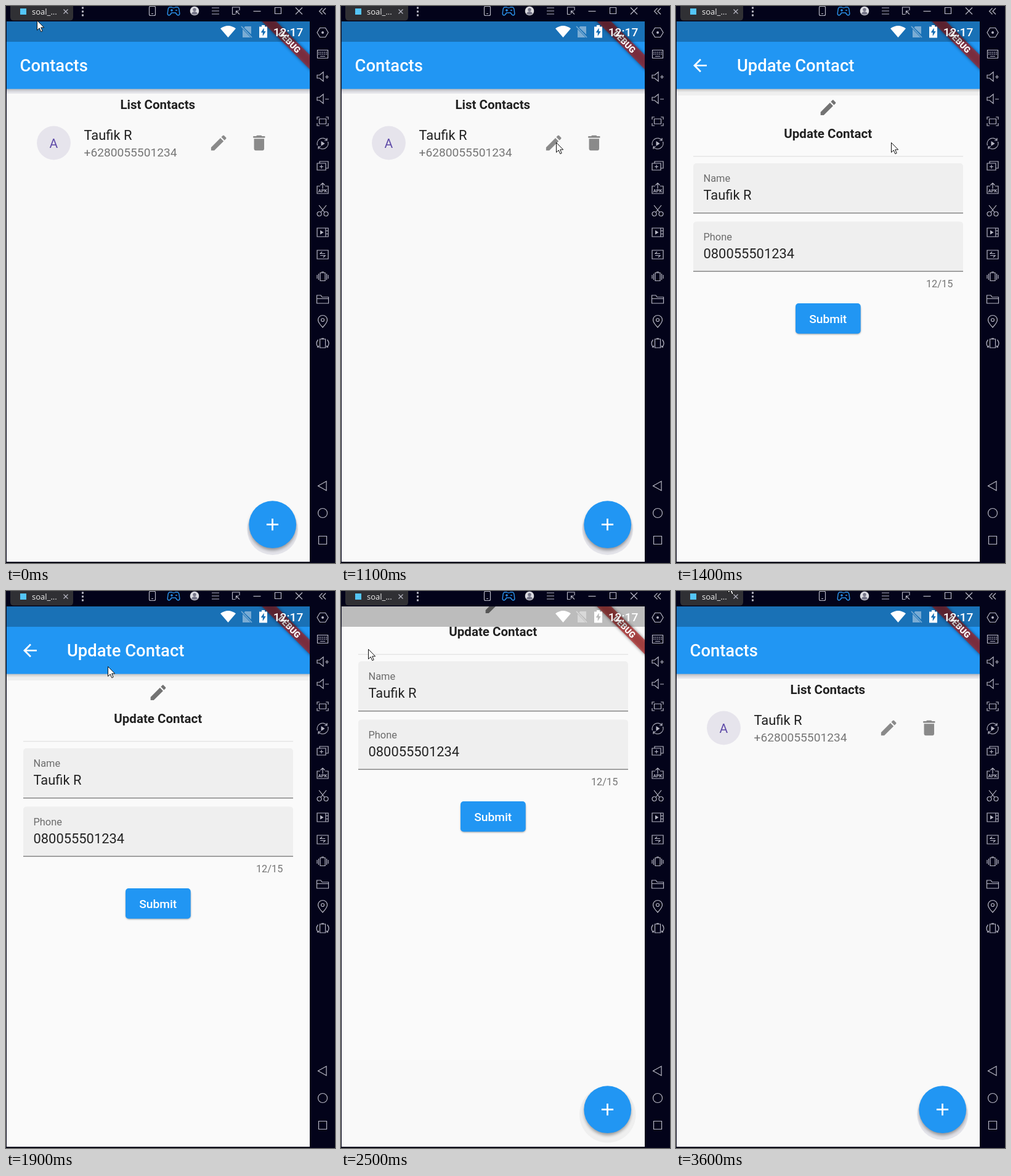
Write an HTML page that moves like this. It is 534 px wide and 903 px high and loops after 4.3 s.

```html
<!DOCTYPE html>
<html lang="en">
<head>
<meta charset="utf-8">
<title>Contacts</title>
<style>
html, body { margin: 0; width: 100%; height: 100%; overflow: hidden; background: #03031a; }
svg { display: block; width: 100%; height: 100%; }
text { font-family: Roboto, sans-serif; white-space: pre; }
.line { fill: none; stroke: #b8b8c4; stroke-width: 1.2; }
.solid { fill: #b8b8c4; stroke: none; }
</style>
</head>
<body>
<svg id="stage" viewBox="0 0 534 903" xmlns="http://www.w3.org/2000/svg"></svg>
<script>
const LOOP = 4300, STEP = 100, PAGE_H = 876;
const NAME = 'Taufik R', PHONE = '80055501234';

const ICONS = {
  edit: 'M3 17.25V21h3.75L17.81 9.94l-3.75-3.75L3 17.25zM20.71 7.04c.39-.39.39-1.02 0-1.41l-2.34-2.34c-.39-.39-1.02-.39-1.41 0l-1.83 1.83 3.75 3.75 1.83-1.83z',
  bin: 'M6 19c0 1.1.9 2 2 2h8c1.1 0 2-.9 2-2V7H6v12zM19 4h-3.5l-1-1h-5l-1 1H5v2h14V4z',
  add: 'M19 13h-6v6h-2v-6H5v-2h6V5h2v6h6v2z',
  back: 'M20 11H7.83l5.59-5.59L12 4l-8 8 8 8 1.41-1.41L7.83 13H20v-2z'
};

const rect = (x, y, w, h, fill, extra = '') =>
  `<rect x="${x}" y="${y}" width="${w}" height="${h}" fill="${fill}" ${extra}/>`;
const circle = (x, y, r, fill, extra = '') =>
  `<circle cx="${x}" cy="${y}" r="${r}" fill="${fill}" ${extra}/>`;
const text = (x, y, size, fill, str, weight = 400, anchor = 'start') =>
  `<text x="${x}" y="${y}" font-size="${size}" fill="${fill}" font-weight="${weight}" text-anchor="${anchor}">${str}</text>`;
const icon = (name, x, y, fill) =>
  `<path d="${ICONS[name]}" fill="${fill}" transform="translate(${x} ${y}) scale(1.37) translate(-12 -12)"/>`;
const glyph = (x, y, d, more = '') =>
  `<g class="line" transform="translate(${x} ${y})"><path d="${d}"/>${more}</g>`;
const solid = d => `<path class="solid" d="${d}"/>`;

function appBar(title, x, depth, tint) {
  return rect(1, 134, 492, depth, tint) +
    rect(1, 134, 492, 6, 'url(#shade)') +
    rect(1, 25, 492, 109.5, '#2196f3') +
    text(x, 106, 27.4, '#fff', title, 500);
}

function homePage() {
  return rect(1, 25, 492, PAGE_H, '#f9f9f9') +
    appBar('Contacts', 22.5, 8, '#e4e4e9') +
    text(246.3, 167, 20.5, '#212121', 'List Contacts', 700, 'middle') +
    circle(77.5, 222, 27.4, '#e6e4ec') +
    text(77.3, 229.5, 21, '#5f4ba8', 'A', 400, 'middle') +
    text(126.5, 217, 21.9, '#212121', NAME) +
    text(126.5, 244, 19.2, '#767676', '+62' + PHONE) +
    icon('edit', 345.2, 222, '#8a8a8a') +
    icon('bin', 410.8, 222, '#8a8a8a') +
    circle(432.7, 848.8, 41.2, '#e3e3e9', 'id="halo"') +
    circle(432.7, 844.5, 38, '#000', 'opacity=".35" filter="url(#soft)"') +
    circle(432.7, 840.7, 38.4, '#2196f3') +
    icon('add', 432.5, 840.7, '#fff');
}

function field(y, label, value) {
  return `<path d="M28 ${y + 81}V${y + 5.5}q0-5.5 5.5-5.5h427q5.5 0 5.5 5.5V${y + 81}z" fill="#efefef"/>` +
    rect(28, y + 80, 438, 1.3, '#777') +
    text(44.5, y + 30, 16.4, '#6c6c6c', label) +
    text(44.5, y + 59, 21.9, '#242424', value);
}

function editPage() {
  return rect(1, 25, 492, PAGE_H, '#fafafa') +
    appBar('Update Contact', 99, 11, '#efefef') +
    icon('back', 39, 96.5, '#fff') +
    icon('edit', 247, 164.7, '#737373') +
    text(246.7, 213.5, 20.5, '#212121', 'Update Contact', 700, 'middle') +
    rect(28, 243, 438, 1.4, '#e4e4e4') +
    field(255, 'Name', NAME) +
    field(349.5, 'Phone', '0' + PHONE) +
    text(449.5, 456, 16.4, '#757575', '12/15', 400, 'end') +
    rect(194.5, 485, 105, 47, '#000', 'rx="5" opacity=".4" filter="url(#tight)"') +
    rect(194, 482, 105.7, 49.3, '#2196f3', 'rx="5"') +
    text(246.7, 514, 19.2, '#fff', 'Submit', 500, 'middle');
}

function banner() {
  return `<g transform="translate(493 25) rotate(45)">` +
    rect(-60, 38.4, 120, 16.4, '#000', 'opacity=".5" filter="url(#soft)"') +
    rect(-60, 38.4, 120, 16.4, '#b71c1c', 'fill-opacity=".63"') +
    text(0, 51.6, 14, '#fff', 'DEBUG', 900, 'middle') + '</g>';
}

function statusBar() {
  return rect(1, 25, 492, 33, '#000', 'opacity=".25"') +
    '<path d="M348 36.5Q360.5 27.5 373 36.5L360.5 51Z" fill="#fff"/>' +
    '<g opacity=".42"><path d="M388 33h10v13L386.500 35zM384 37.500L397 51h-13z" fill="#fff"/>' +
    '<path d="M382 33L399 51" stroke="#fff" stroke-width="1.600"/></g>' +
    '<path d="M411 33.500h4v-2.500h5v2.500h4v18h-13zM418.700 35.500l-5 7.500h3v6l5-8h-3z" fill="#fff" fill-rule="evenodd"/>' +
    text(433.7, 49, 19.2, '#fff', '12:17', 500);
}

function windowBar() {
  return '<path d="M7 0h102v18q0 5.500-5.500 5.500h-91q-5.500 0-5.500-5.500z" fill="#303034"/>' +
    rect(23, 4, 10, 10, '#54c5f8') +
    `<text x="42" y="14" font-size="13" fill="#f0f0f0" style="font-family:'Open Sans',sans-serif">soal_...</text>` +
    glyph(97, 9, 'M-3.500-3.500l7 7m0-7l-7 7') +
    [3, 9, 15].map(y => rect(123, y - 1.5, 3, 3, '#b8b8c4')).join('') +
    glyph(237.5, 8, 'M-5-5.500q0-2 2-2h6q2 0 2 2v11q0 2-2 2h-6q-2 0-2-2zM-1.500 4.500h3') +
    '<path d="M266 2h3q3 2 6 0h3q2.500 0 3 4l.800 6q0 3-2.500 3-1.500 0-4-4h-6.600q-2.500 4-4 4-2.500 0-2.500-3l.800-6q.500-4 3-4zM267 7h4m-2-2v4M275 7h3" fill="none" stroke="#2a8fe6" stroke-width="1.500"/>' +
    circle(306, 8, 7.3, '#dcdce2') + circle(306, 6, 2.7, '#77778a') +
    '<path d="M301 12.500q1-3.500 5-3.500t5 3.500q-5 3.500-10 0z" fill="#77778a"/>' +
    glyph(340, 8, 'M-6-5h12M-6 0h12M-6 5h12') +
    glyph(373.5, 8, 'M-1 5.500h-5v-11.500h11.500v5M0 0l5.500 5.500M0 4.500V0h4.500') +
    glyph(407.5, 8, 'M-6 .500h12') +
    glyph(441.500, 8, 'M-5-5.500h10v10h-10z') +
    glyph(475.5, 8, 'M-5.500-5.500l11 11m0-11l-11 11') +
    glyph(514, 8.5, 'M-.500-5l-5 5 5 5M5-5l-5 5 5 5');
}

function sideBar() {
  const speaker = 'M-9-3h4l6-5v15l-6-5h-4z';
  const phone = 'M-4-6.500h8v13h-8z';
  const tile = 'M-9-7h18v14h-18z';
  const keys = [-3, 0].map(y => [-6, -3, 0, 3, 6].map(x => solid(`M${x - .8} ${y - .8}h1.600v1.600h-1.600z`)).join('')).join('');
  return [
    [43, 'M-9 0l4.500-7.500h9l4.500 7.500-4.500 7.500h-9z', '<circle class="solid" r="2"/>'],
    [78, 'M-8.500-6.500h17v13h-17zM-4 3.500h8', keys],
    [115, speaker + 'M4 0h6M7-3v6'],
    [151, speaker + 'M4 0h6'],
    [187, 'M-9-3v-4h4M5-7h4v4M9 3v4h-4M-5 7h-4v-4M-5.500-4h11v8h-11z'],
    [223, 'M-8.500 3a9 9 0 0 1 15-9M8.500-3a9 9 0 0 1-15 9M7-9v4h-4M-7 9v-4h4', solid('M-2.500-4l6 4-6 4z')],
    [259, 'M-9-4h14v11h-14zM-5-4v-3h14v11h-4M-2-1.500v6M-5 1.500h6'],
    [296, 'M-4-4h-5v12h18v-12h-5M0 0v-9M-3.500-5.500l3.500-3.500 3.500 3.500',
      '<text class="solid" y="6" font-size="7.500" font-weight="700" text-anchor="middle">APK</text>'],
    [332, 'M-6-9l9.500 12M6-9l-9.500 12M-9 5a3.500 3.500 0 1 0 7 0 3.500 3.500 0 1 0-7 0M2 5a3.500 3.500 0 1 0 7 0 3.500 3.500 0 1 0-7 0'],
    [367, tile + 'M5-7v14M5-2.500h4M5 2.500h4', solid('M-4-3.500l5.500 3.500-5.500 3.500z')],
    [403, tile + 'M4-1.500h-8l3-3M-4 1.500h8l-3 3'],
    [439, phone + 'M-6.500-5v10M6.500-5v10M-9-3v6M9-3v6M-2-8h4'],
    [475.5, 'M-9.500 6.500v-13h6.500l2 3h10.500v10zM-9.500-1h19'],
    [511, 'M0 10q-7.500-8-7.500-12a7.500 7.500 0 0 1 15 0q0 4-7.500 12z', '<circle cy="-2" r="2.500"/>'],
    [547, 'M-4.500-7h9v14h-9zM-2-8h4M-7.500-6q-5 6 0 12M7.500-6q5 6 0 12', solid('M-9.500 6.500h3.500v-3.500zM9.500 6.500h-3.500v-3.500z')],
    [778, 'M-7.500 0L6-7.500v15z'],
    [822, 'M-7.500 0a7.500 7.500 0 1 0 15 0a7.500 7.500 0 1 0-15 0'],
    [866, 'M-6.500-6.500h13v13h-13z']
  ].map(([y, d, more]) => glyph(514, y, d, more)).join('');
}

const stage = document.getElementById('stage');
stage.innerHTML = `<defs>
  <clipPath id="screen"><rect x="1" y="25" width="492" height="${PAGE_H}"/></clipPath>
  <linearGradient id="shade" x2="0" y2="1">
    <stop offset="0" stop-color="#000" stop-opacity=".2"/>
    <stop offset="1" stop-color="#000" stop-opacity="0"/>
  </linearGradient>
  <filter id="soft" x="-30%" y="-60%" width="160%" height="220%"><feGaussianBlur stdDeviation="2.800"/></filter>
  <filter id="tight" x="-10%" y="-20%" width="120%" height="140%"><feGaussianBlur stdDeviation="1.500"/></filter>
</defs>` +
  rect(0, 0, 534, 903, '#03031a') + windowBar() + sideBar() +
  `<g clip-path="url(#screen)">${homePage()}<g id="edit">${editPage()}</g>${banner()}${statusBar()}</g>` +
  '<path id="cursor" d="M.500.500V16.300L4.200 12.800 6.800 18.700 9.200 17.600 6.700 11.900H11.700Z" fill="#fff" stroke="#111" stroke-width="1"/>';

const edit = document.getElementById('edit');
const halo = document.getElementById('halo');
const cursor = document.getElementById('cursor');

// Pointer path: time, x, y
const PATH = [
  [0, 50, 23], [100, 72, 40], [200, 165, 115], [300, 290, 198], [400, 380, 245],
  [500, 391, 243], [600, 355, 225], [700, 349, 221], [1400, 349, 221],
  [1500, 347, 219], [1600, 336, 213], [1700, 300, 187], [1800, 236, 152],
  [1900, 165, 122], [2000, 103, 103], [2100, 60, 96], [2200, 45, 94],
  [2300, 44, 94], [2800, 44, 94], [2900, 46, 87], [3100, 61, 38],
  [3300, 81, -7], [3400, 81, -7], [3600, 84, -13], [LOOP, 84, -13]
];

function pointer(t) {
  const i = PATH.findIndex(p => p[0] > t);
  const [t0, x0, y0] = PATH[i - 1], [t1, x1, y1] = PATH[i];
  const k = (t - t0) / (t1 - t0);
  return [x0 + (x1 - x0) * k, y0 + (y1 - y0) * k];
}

// cubic-bezier(.25, .1, .25, 1)
function ease(x) {
  if (x <= 0) return 0;
  if (x >= 1) return 1;
  let lo = 0, hi = 1, s = .5;
  for (let i = 0; i < 24; i++) {
    s = (lo + hi) / 2;
    if (.75 * s * (1 - s) + s ** 3 < x) lo = s; else hi = s;
  }
  return .3 * s * (1 - s) ** 2 + 3 * s * s * (1 - s) + s ** 3;
}

// The edit page drops in from above and leaves the same way.
function openness(t) {
  if (t < 2500) return ease((t - 1100) / 300);
  return ease(1 - (t - 2362) / 300);
}

function draw(ms) {
  const t = Math.floor((ms % LOOP) / STEP) * STEP;
  const open = openness(t);
  const leaving = t >= 2500 && open > 0;
  edit.setAttribute('transform', `translate(0 ${Math.round((open - 1) * PAGE_H)})`);
  edit.setAttribute('visibility', open > 0 ? 'visible' : 'hidden');
  halo.setAttribute('r', leaving ? 45.7 : 41.2);
  halo.setAttribute('fill', leaving ? '#efefef' : '#e3e3e9');
  const [x, y] = pointer(t);
  cursor.setAttribute('transform', `translate(${Math.round(x)} ${Math.round(y)})`);
}

const start = performance.now();
function tick() {
  draw(performance.now() - start);
  requestAnimationFrame(tick);
}
draw(0);
requestAnimationFrame(tick);
</script>
</body>
</html>
```
